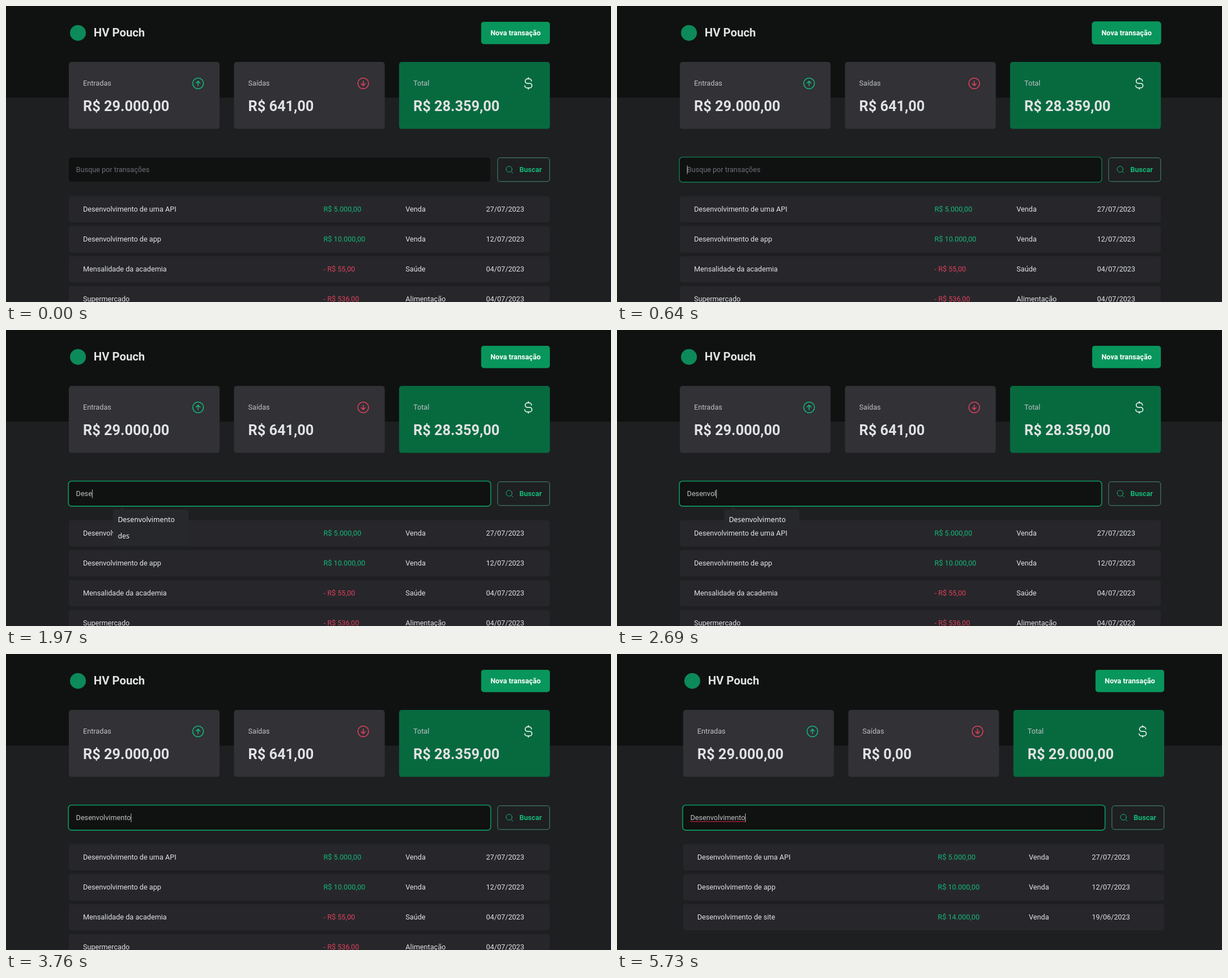
An HTML page for the animation above (6570 ms loop, 1068x524 px).

```html
<!DOCTYPE html>
<html lang="pt-BR">
<head>
<meta charset="utf-8">
<title>Transações</title>
<style>
  html, body { margin: 0; width: 100%; height: 100%; overflow: hidden; background: #1e1f21; }
  svg { display: block; width: 1068px; height: 524px; font-family: Roboto, sans-serif; }
</style>
</head>
<body>
<svg id="stage" viewBox="0 0 1068 524"></svg>
<script>
const LOOP = 6570, REM = 12.67, RESULT = 4660;
const GREEN = '#13b877', RED = '#de405c', LIGHT = '#e0e2e3', LABEL = '#c0c2c4', BUTTON = '#08965c';
const stage = document.getElementById('stage');
const ctx = document.createElement('canvas').getContext('2d');

// [time, letters visible]
const TYPING = [[1510, 1], [1660, 2], [1800, 3], [1930, 4], [2270, 6], [2490, 7], [2690, 8],
  [2830, 9], [2950, 10], [3120, 11], [3230, 12], [3330, 13], [3430, 14], [3550, 15]];
const WORD = 'Desenvolvimento';

const ROWS = [
  ['Desenvolvimento de uma API', 'R$ 5.000,00', 'Venda', '27/07/2023'],
  ['Desenvolvimento de app', 'R$ 10.000,00', 'Venda', '12/07/2023'],
  ['Mensalidade da academia', '- R$ 55,00', 'Saúde', '04/07/2023'],
  ['Supermercado', '- R$ 536,00', 'Alimentação', '04/07/2023']
];
const FOUND = [ROWS[0], ROWS[1], ['Desenvolvimento de site', 'R$ 14.000,00', 'Venda', '19/06/2023']];

const ARROW = '<circle cx="128" cy="128" r="96"/><path d="M94 122L128 88L162 122M128 88V168"/>';
const DOLLAR = '<path d="M128 24V48M128 208V232M184 88a40 40 0 0 0-40-40H112a40 40 0 0 0 0 80h40' +
  'a40 40 0 0 1 0 80H104a40 40 0 0 1-40-40"/>';
const LENS = '<circle cx="116" cy="116" r="84"/><path d="M175.4 175.4L224 224"/>';

const rect = (x, y, w, h, fill, r = 4.75, extra = '') =>
  `<rect x="${x}" y="${y}" width="${w}" height="${h}" rx="${r}" fill="${fill}" ${extra}/>`;

// Text whose line box is centred on cy
const text = (x, cy, str, fill, size = REM, extra = '') =>
  `<text x="${x}" y="${cy + size * 0.342}" font-size="${size}" fill="${fill}" ${extra}>${str}</text>`;
const bold = (x, cy, str, fill, size = REM, extra = '') =>
  text(x, cy, str, fill, size, 'font-weight="700" ' + extra);

// Icons live in a 256-unit box centred on (cx, cy)
const icon = (cx, cy, size, color, body, turn = 0) =>
  `<g transform="translate(${cx} ${cy}) rotate(${turn}) scale(${size / 256}) translate(-128 -128)" fill="none"
    stroke="${color}" stroke-width="16" stroke-linecap="round" stroke-linejoin="round">${body}</g>`;

function ramp(t, from, to) {
  const p = Math.min(1, Math.max(0, (t - from) / (to - from)));
  return p * p * (3 - 2 * p);
}

function header(t) {
  const grow = 1.6 * ramp(t, 30, 280) * (1 - ramp(t, 550, 700));
  return '<circle cx="127" cy="47.7" r="14" fill="#0c8a5a"/>' +
    bold(154.8, 47.3, 'HV Pouch', LIGHT, 20.3) +
    rect(838.8 - grow, 27.9 - grow, 121.3 + 2 * grow, 39.6 + 2 * grow, BUTTON, 4.75 + grow) +
    bold(899.5, 47.7, 'Nova transação', '#fff', REM, 'text-anchor="middle"');
}

function card(i, label, value, fill, color, body, turn) {
  const x = 110.9 + i * 291.5;
  return rect(x, 99, 266.2, 118.6, fill) +
    text(x + 25.1, 137, label, LABEL) +
    bold(x + 25.1, 177.2, value, LIGHT, 25.34) +
    icon(x + 228.2, 137, 25.34, color, body, turn);
}

function search(t, typed) {
  const focus = ramp(t, 550, 700), end = 123.6 + ctx.measureText(typed).width;
  const busy = t >= 4550 && t < RESULT;
  let out = rect(110.9, 268.3, 744, 42.8, '#101111');
  if (focus) out += rect(110.1, 267.5, 745.6, 44.4, 'none', 5.5,
    `stroke="#0a9a5f" stroke-width="1.6" opacity="${focus}"`);
  out += typed ? text(123.6, 289.7, typed, LABEL) : text(123.6, 289.7, 'Busque por transações', '#6f7078');
  if (t >= 550) out += rect(end, 282.4, 0.9, 15.2, '#d0d2d3', 0);
  if (t >= 4550) out += rect(123.6, 296, end - 123.6, 1.2, '#c2203c', 0);
  out += rect(867.9, 268.7, 91.8, 42, 'none', 4.4,
    `stroke="${busy ? '#57595c' : '#4a9a7c'}" stroke-width="0.9"`);
  return out + `<g opacity="${busy ? 0.66 : 1}">` + icon(888.9, 289.7, 15.84, GREEN, LENS) +
    bold(906.2, 289.7, 'Buscar', GREEN) + '</g>';
}

function table(rows, cols) {
  return rows.map((row, i) => {
    const cy = 359.8 + i * 53.07;
    return rect(110.9, cy - 23.3, 849.2, 46.6, '#27272b') + row.map((str, c) =>
      text(cols[c], cy, str, c !== 1 ? LIGHT : str[0] === '-' ? RED : GREEN)).join('');
  }).join('');
}

function suggestions(t) {
  const alpha = ramp(t, 1580, 1680) * (1 - ramp(t, 3600, 3760));
  if (!alpha) return '';
  const both = t < 2060, font = 'font-family="Noto Sans, sans-serif"';
  return `<g opacity="${alpha}"><path d="M200 318.5L205 313.5L210 318.5Z" fill="#27282b"/>` +
    rect(189, 318, 133, both ? 64 : 35.5, '#27282b', 2.5) +
    text(197.4, 335.8, WORD, '#f2f3f3', 12.3, font) +
    (both ? text(197.4, 364.3, 'des', '#f2f3f3', 12.3, font) : '') + '</g>';
}

function scene(t) {
  const done = t >= RESULT;
  const letters = TYPING.reduce((n, [at, count]) => t >= at ? count : n, 0);
  return rect(0, 0, 1068, 524, '#1e1f21', 0) + rect(0, 0, 1068, 162.2, '#101211', 0) +
    `<g transform="translate(${done ? 5.85 : 0} 0)">` + header(t) +
    card(0, 'Entradas', 'R$ 29.000,00', '#313136', GREEN, ARROW, 0) +
    card(1, 'Saídas', done ? 'R$ 0,00' : 'R$ 641,00', '#313136', RED, ARROW, 180) +
    card(2, 'Total', done ? 'R$ 29.000,00' : 'R$ 28.359,00', '#076a3f', '#fff', DOLLAR, 0) +
    search(t, WORD.slice(0, letters)) +
    (done ? table(FOUND, [135.9, 560.5, 721.2, 832.4]) : table(ROWS, [135.9, 560.5, 705.3, 847.5])) +
    suggestions(t) + '</g>';
}

const start = performance.now();
function draw() {
  ctx.font = `${REM}px Roboto, sans-serif`;
  stage.innerHTML = scene((performance.now() - start) % LOOP);
  requestAnimationFrame(draw);
}
draw();
</script>
</body>
</html>
```
